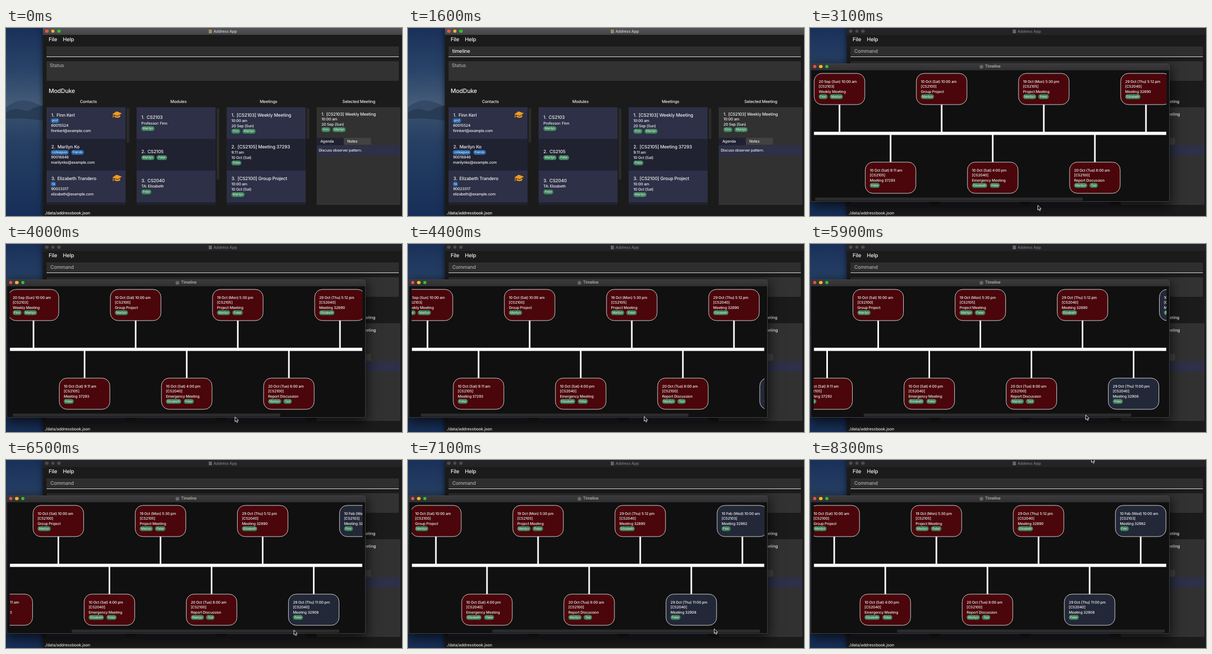
Write an HTML page that moves like this. It is 752x356 px and loops after 8500 ms.

```html
<!DOCTYPE html>
<html lang="en">
<head>
<meta charset="utf-8">
<title>Timeline window</title>
<style>
@property --typed { syntax: "<number>"; inherits: true; initial-value: 0; }
@property --open { syntax: "<number>"; inherits: true; initial-value: 0; }
@property --scroll { syntax: "<number>"; inherits: true; initial-value: 0; }

html, body { margin: 0; width: 100%; height: 100%; overflow: hidden; background: #000; }
#stage {
  position: relative; width: 752px; height: 356px; overflow: hidden;
  font: 500 7.2px/10px Inter, Roboto, sans-serif; letter-spacing: -.025em; color: #f0f0f0;
  text-rendering: geometricPrecision;
  animation: type 8.5s infinite, open 8.5s infinite step-end, scroll 8.5s infinite;
}
#stage * { box-sizing: border-box; }
#stage div, #stage p, #stage svg { position: absolute; margin: 0; }
p { white-space: pre; }
.mid { transform: translateX(-50%); }

.desk { width: 72px; height: 356px; }
.main { left: 70px; top: 0; width: 684px; height: 356px; background: #1b1b1b; box-shadow: 0 0 10px #000a; }
.bar { width: 100%; height: 13px; background: linear-gradient(#3a3a3c, #303032); }
.light { width: 6.6px; height: 6.6px; border-radius: 50%; }
.idle { opacity: var(--open); }
.busy { opacity: calc(1 - var(--open)); }
.a { background: #2d3046; }
.b { background: #202231; }
.thumb { background: #2b2b2b; border-radius: 1px; }
.tag { font-weight: 400; font-size: 6px; line-height: 9px; height: 9px; display: inline-block;
  vertical-align: top; padding: 0 2.6px; margin-right: 4.6px; border-radius: 4.5px; background: #3f875e; }
.blue .tag { background: #2b68ae; }
.typed span { opacity: calc(var(--typed) - var(--i)); }

.win { left: 1px; top: 67px; width: 682px; height: 262px; background: #101010; border: 1px solid #404042;
  border-radius: 4px 4px 2px 2px; overflow: hidden; }
.pop { left: 0; top: 0; width: 752px; height: 356px; transform-origin: 342px 198px;
  animation: pop 8.5s infinite step-end; }
.shade { left: 1px; top: 67px; width: 682px; height: 262px; box-shadow: 0 7px 22px 2px #000b; }
.view { left: 7px; top: 80px; width: 670px; height: 240px; overflow: hidden; }
.track { left: 0; top: 0; transform: translate(calc(.5px - var(--scroll) * 1px), -.5px); }
.axis { transform: translate(.5px, -.5px); }
.card { width: 97px; height: 60px; border: 1px solid #d4d4d4; border-radius: 15px; background: #4a060b; }
.card.next { background: #232838; }
.stem { background: #fff; }
.slide { transform: translateX(calc(var(--scroll) / 1.312 * 1px)); }
.mouse { left: 0; top: 0; width: 9px; height: 13px; animation: mouse 8.5s infinite; }

@keyframes type {
  0%, 2.35% { --typed: 0; animation-timing-function: steps(8); }
  18.82% { --typed: 8; animation-timing-function: step-end; }
  23.52%, 100% { --typed: 0; }
}
@keyframes open {
  0% { --open: 0; }
  23.52%, 100% { --open: 1; }
}
@keyframes pop {
  0% { opacity: 0; transform: scale(.85); }
  23.52% { opacity: .45; transform: scale(.9); }
  24.7% { opacity: .85; transform: scale(.98); }
  25.88%, 100% { opacity: 1; transform: none; }
}
@keyframes scroll {
  0%, 45.88% { --scroll: 0; animation-timing-function: steps(5); }
  51.76% { --scroll: 19; animation-timing-function: steps(3); }
  55.29% { --scroll: 54; animation-timing-function: steps(3); }
  58.82% { --scroll: 88.5; animation-timing-function: steps(4); }
  63.52% { --scroll: 110; animation-timing-function: steps(5); }
  69.41% { --scroll: 120.5; animation-timing-function: steps(2); }
  71.76% { --scroll: 121; animation-timing-function: steps(5); }
  77.64% { --scroll: 158; animation-timing-function: steps(5); }
  83.52% { --scroll: 197; animation-timing-function: steps(2); }
  85.88%, 100% { --scroll: 204; }
}
@keyframes mouse {
  0%, 32.93% { opacity: 0; transform: translate(430px, 353px); }
  32.94% { opacity: 1; transform: translate(430px, 353px); animation-timing-function: steps(3); }
  36.47% { transform: translate(432px, 335px); animation-timing-function: steps(5); }
  42.35%, 45.88% { transform: translate(431px, 327px); animation-timing-function: steps(5); }
  51.76% { transform: translate(448px, 326px); animation-timing-function: steps(3); }
  55.29% { transform: translate(473px, 325px); animation-timing-function: steps(3); }
  58.82% { transform: translate(499px, 323px); animation-timing-function: steps(4); }
  63.52% { transform: translate(515px, 323px); animation-timing-function: steps(5); }
  69.41%, 71.76% { transform: translate(523px, 323px); animation-timing-function: steps(5); }
  77.64% { transform: translate(552px, 321px); animation-timing-function: steps(5); }
  83.52% { transform: translate(581px, 319px); animation-timing-function: steps(2); }
  85.88% { transform: translate(587px, 318px); animation-timing-function: steps(2); }
  88.23% { transform: translate(587px, 316px); animation-timing-function: steps(3); }
  91.76% { transform: translate(552px, 71px); animation-timing-function: steps(1); }
  92.94%, 94.11% { transform: translate(551px, 9px); animation-timing-function: steps(3); }
  97.64%, 100% { opacity: 1; transform: translate(534px, -5px); }
}
</style>
</head>
<body>
<div id="stage"></div>
<script>
const box = (x, y, w, h, fill, cls = '') =>
  `<div class="${cls}" style="left:${x}px;top:${y}px;width:${w}px;height:${h}px;${fill ? 'background:' + fill : ''}"></div>`;
// y is the middle of the line
const text = (x, y, s, size = 7.2, cls = '', color = '') =>
  `<p class="${cls}" style="left:${x}px;top:${y - 5}px;font-size:${size}px;${color ? 'color:' + color : ''}">${s}</p>`;
const tags = (x, y, names, cls = '') =>
  text(x, y + .5, names.split(' ').map(n => `<b class="tag">${n}</b>`).join(''), 6, cls);
const lights = (x, y, colors, cls = '') =>
  colors.map((c, i) => box(x - 3.3 + i * 11.4, y - 3.3, 6.6, 6.6, c, 'light ' + cls)).join('');
const RGB = ['#ee4f49', '#f2b52f', '#30bd40'];
const GREY = ['#4b4b4e', '#4b4b4e', '#4b4b4e'];

const desk = `<svg class="desk" viewBox="0 0 72 356">
  <defs>
    <linearGradient id="sky" x2="0" y2="1">
      <stop stop-color="#1a3059"/><stop offset=".5" stop-color="#294468"/><stop offset="1" stop-color="#4c627d"/>
    </linearGradient>
    <linearGradient id="sea" x2="0" y2="1">
      <stop stop-color="#3a516e"/><stop offset=".3" stop-color="#263f63"/><stop offset="1" stop-color="#172f58"/>
    </linearGradient>
  </defs>
  <path fill="url(#sky)" d="M0 0h72v160H0z"/>
  <path fill="url(#sea)" d="M0 156h72v200H0z"/>
  <path fill="#344a67" d="M0 150Q18 136 34 137T72 150V168H0z"/>
  <path fill="#283c56" d="M0 160Q16 150 30 155T50 152L72 146V176Q40 170 0 172z"/>
</svg>`;

const cap = y => `<svg style="left:202px;top:${y}px" width="18" height="14" viewBox="0 0 18 14" fill="#f29a1f">
  <path d="M0 5 8-.2 18 3.6 10 8.6z"/><path d="M4 7.4 10 9.8 15 6.8V10Q11 14 4 10.4z"/>
  <path d="M1.3 5.6 2.4 6 2.2 11.5H.6z"/></svg>`;

function mainWindow() {
  let h = box(70, 0, 684, 356, '', 'main') + box(70, 0, 682, 13, 'linear-gradient(#545456, #444446)')
    + box(70, 0, 682, 13, '#242426', 'idle')
    + lights(77.5, 6, RGB, 'busy') + lights(77.5, 6, GREY, 'idle')
    + box(385, 3, 6, 7, '#a08a62', 'busy') + box(385, 3, 6, 7, '#66666a', 'idle')
    + text(394, 6.5, 'Address App', 7.5, 'busy', '#d2d2d2') + text(394, 6.5, 'Address App', 7.5, 'idle', '#7c7c80')
    + text(81, 22, 'File', 10) + text(108, 22, 'Help', 10)
    + box(77, 35, 669, 20, '#2e2e2e') + box(77, 54, 669, 1, '#e4e4e4')
    + text(84, 45, 'Command', 9.4, 'idle', '#a9a9a9')
    + text(84, 45, [...'timeline'].map((c, i) => `<span style="--i:${i}">${c}</span>`).join(''), 9.4, 'typed')
    + box(77, 63, 669, 37, '#323232') + text(83, 72, 'Status', 9.3, 'busy', '#a6a6a6')
    + text(81, 119, 'ModDuke', 11.2);

  [['Contacts', 156.5], ['Modules', 327.5], ['Meetings', 498.5], ['Selected Meeting', 670]]
    .forEach(([s, x]) => h += text(x, 139, s, 7.8, 'mid'));

  [[77, 65], [248, 135], [419, 58]].forEach(([x, len]) => {
    for (let r = 0; r < 4; r++) h += box(x, 150 + r * 60, 150, r < 3 ? 60 : 5, '', r % 2 ? 'b' : 'a');
    h += box(x + 152, 152, 5, len, '', 'thumb');
  });

  [['Finn Kerl', 'prof', '80015524', 'finnkerl'],
   ['Marilyn Ko', 'colleagues friends', '90018846', 'marilynko'],
   ['Elizabeth Trandero', 'ta', '90023317', 'elizabeth']].forEach(([name, tag, phone, mail], i) => {
    const y = 165.5 + i * 60;
    h += text(86, y, `${i + 1}.  ${name}`, 8.6) + tags(85, y + 10, tag, 'blue')
      + text(85.5, y + 19.5, phone) + text(85.5, y + 29.5, mail + '@example.com');
    if (i !== 1) h += cap(y - 7.5);
  });

  h += text(257, 170, '1.  CS2103', 8.6) + text(257, 181, 'Professor: Finn') + tags(257, 190, 'Marilyn')
    + text(257, 235, '2.  CS2105', 8.6) + tags(257, 245, 'Marilyn Peter')
    + text(257, 290, '3.  CS2040', 8.6) + text(257, 300, 'TA: Elizabeth') + tags(257, 310, 'Peter');

  [['[CS2103] Weekly Meeting', '10:00 am', '20 Sep (Sun)', 'Finn Marilyn'],
   ['[CS2105] Meeting 37293', '9:11 am', '10 Oct (Sat)', 'Peter'],
   ['[CS2100] Group Project', '10:00 am', '10 Oct (Sat)', 'Marilyn']].forEach(([name, time, day, who], i) => {
    const y = 166 + i * 60;
    h += text(428, y, `${i + 1}.  ${name}`, 8.7) + text(428, y + 10, time)
      + text(428, y + 19.5, day) + tags(428, y + 29, who);
  });

  h += box(590, 150, 159, 185, '#313131')
    + text(599, 163, '1.  [CS2103] Weekly Meeting', 7.95) + text(599, 173, '10:00 am')
    + text(599, 183, '20 Sep (Sun)') + tags(599, 192, 'Finn Marilyn')
    + box(590, 208, 51, 14, '#202231') + box(642, 208, 51, 13, '#424242')
    + text(597, 215, 'Agenda') + text(648, 215, 'Notes')
    + box(590, 222, 159, 20, '#2d3046') + text(594, 232, 'Discuss observer pattern.', 7);
  return h + text(73, 350, './data/addressbook.json', 7.8);
}

const MEETINGS = [
  ['20 Sep (Sun) 10:00 am', 'CS2103', 'Weekly Meeting', 'Finn Marilyn'],
  ['10 Oct (Sat) 9:11 am', 'CS2105', 'Meeting 37293', 'Peter'],
  ['10 Oct (Sat) 10:00 am', 'CS2100', 'Group Project', 'Marilyn'],
  ['10 Oct (Sat) 4:00 pm', 'CS2040', 'Emergency Meeting', 'Elizabeth Peter'],
  ['19 Oct (Mon) 5:30 pm', 'CS2105', 'Project Meeting', 'Marilyn Peter'],
  ['20 Oct (Tue) 8:00 am', 'CS2100', 'Report Discussion', 'Marilyn Ted'],
  ['29 Oct (Thu) 5:12 pm', 'CS2040', 'Meeting 32890', 'Elizabeth'],
  ['29 Oct (Thu) 11:00 pm', 'CS2040', 'Meeting 32908', 'Peter'],
  ['10 Feb (Wed) 10:00 am', 'CS2103', 'Meeting 32982', 'Finn']
];

function card([time, code, name, who], i) {
  const x = i * 97, low = i % 2, y = low ? 174 : 6;
  return box(x + 47, low ? 122 : 65, 3, 53, '', 'stem')
    + box(x, y, 97, 60, '', i > 6 ? 'card next' : 'card')
    + text(x + 9, y + 15.5, time, 7) + text(x + 9, y + 25.3, `[${code}]`, 7)
    + text(x + 9, y + 35, name, 7) + tags(x + 9, y + 44.5, who);
}

const timeline = `<div class="pop"><div class="shade"></div><div class="win"><div class="bar" style="height:12px"></div></div>`
  + lights(9, 72.8, RGB) + box(322, 69.5, 7, 7, '#68686a', 'light') + text(332.5, 73, 'Timeline', 7.55, '', '#bdbdbd')
  + `<div class="view"><div class="track">${MEETINGS.map(card).join('')}</div>${box(0, 117, 669, 6, '#fff', 'axis')}</div>`
  + box(10, 321, 508, 6, '', 'thumb slide') + '</div>';

const mouse = `<svg class="mouse" viewBox="0 0 9 13"><path d="M.5.7V9.6L2.6 7.7 4.1 11.2 5.7 10.5 4.2 7.2H7z"
  fill="#000" stroke="#fff" stroke-width=".9"/></svg>`;

document.getElementById('stage').innerHTML = desk + mainWindow() + timeline + mouse;
</script>
</body>
</html>
```
